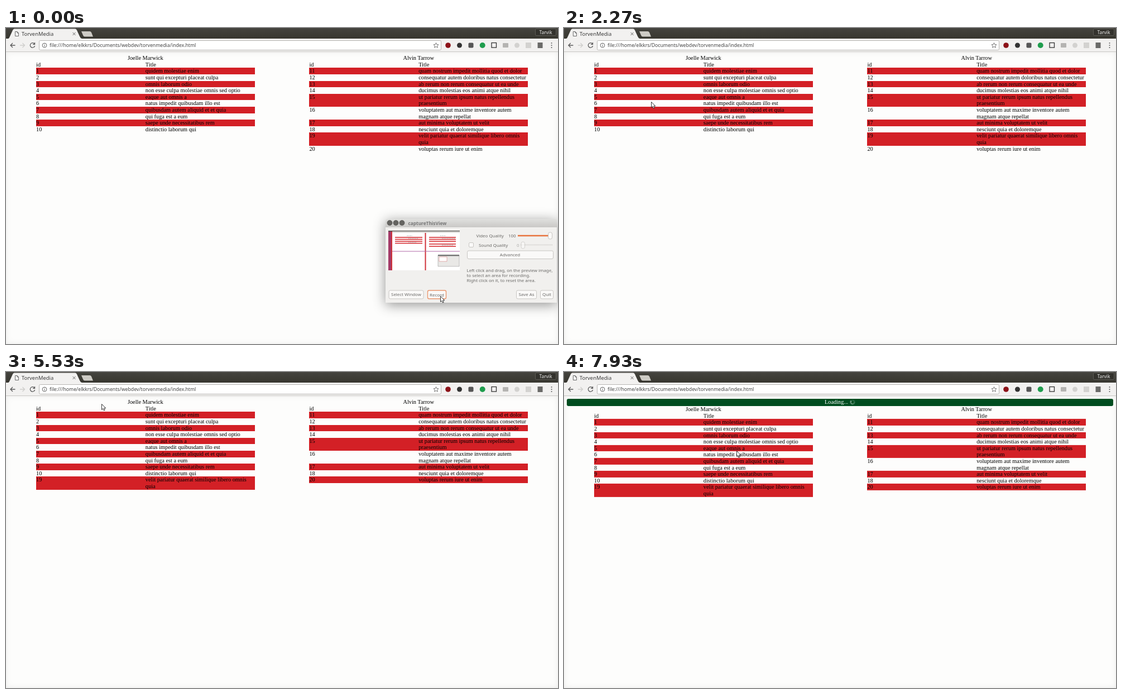
An HTML page for the animation above (8 s loop, 989 px wide and 566 px high).

```html
<!DOCTYPE html>
<html lang="en">
<head>
<meta charset="utf-8">
<title>Drag and drop tables</title>
<style>
html, body { margin: 0; width: 100%; height: 100%; overflow: hidden; background: #fdfdfc; }
#stage { position: relative; width: 989px; height: 566px; overflow: hidden; }
#stage > * { position: absolute; }
svg { display: block; left: 0; top: 0; }
.ui { font-family: "Noto Sans", "Open Sans", sans-serif; }

/* page */
.page, .ghost, #bar { font: 10.3px/11.59px "Liberation Serif", "Times New Roman", serif; color: #000; }
.page { left: 0; top: 48.2px; width: 989px; }
.list { position: absolute; top: 0; left: 54.1px; width: 391.5px; }
.list + .list { left: 543.45px; }
.name { text-align: center; }
.row { display: flex; }
.row span { width: 50%; }
.red { background: #d32026; }
.glow { inset: 43px 0 0; box-shadow: inset 0 0 12px rgba(0, 0, 0, .07); }

#bar { left: 5px; top: 48.2px; width: 979px; height: 12.9px; border-radius: 3px;
  background: #004d20; color: #fff; visibility: hidden; }
#bar b { position: absolute; left: 462px; font-weight: normal; }
#bar svg { position: absolute; left: 506.5px; top: 1.3px; animation: spin 1s steps(12) infinite; }

.ghost { left: 0; top: 0; width: 391.5px; opacity: .74; visibility: hidden;
  box-shadow: 0 6px 14px rgba(0, 0, 0, .4); }

/* timeline */
.before { animation: before 8s step-end infinite; }
.after { animation: after 8s step-end infinite; }
.page { visibility: hidden; }
#bar { animation: load 8s step-end infinite; }
#shift { inset: 0; animation: shift 8s step-end infinite; }
#shift > * { position: absolute; }
#recorder { animation: close 8s linear infinite; }
#g1 { animation: drag1 8s linear infinite, show1 8s step-end infinite; }
#g2 { animation: drag2 8s linear infinite, show2 8s step-end infinite; }
#pointer { left: 0; top: 0; animation: move 8s linear infinite; }
#arrow { animation: arrow 8s step-end infinite; }
#hand { animation: hand 8s step-end infinite; }

@keyframes before { 0% { visibility: visible } 51.25%, 100% { visibility: hidden } }
@keyframes after { 0% { visibility: hidden } 51.25%, 100% { visibility: visible } }
@keyframes load {
  0%, 51.25% { visibility: hidden }
  30%, 87.5%, 100% { visibility: visible }
}
@keyframes shift {
  0%, 51.25% { translate: 0 0 }
  30%, 87.5%, 100% { translate: 0 12.9px }
}
@keyframes close {
  0%, .875% { opacity: 1 }
  4.4%, 100% { opacity: 0 }
}
@keyframes drag1 {
  0%, 15.75% { translate: 543.4px 187.3px }
  17% { translate: 475px 178px }
  19.125%, 20% { translate: 212.4px 146.8px }
  21.5% { translate: 85px 126px }
  25%, 100% { translate: 64px 124px }
}
@keyframes show1 { 0%, 25.9% { visibility: hidden } 15.75% { visibility: visible } 100% { visibility: hidden } }
@keyframes drag2 {
  0%, 81.5% { translate: 543.4px 140.9px }
  85% { translate: 160px 138px }
  86.6%, 100% { translate: 72px 130px }
}
@keyframes show2 { 0%, 86.9% { visibility: hidden } 81.5% { visibility: visible } 100% { visibility: hidden } }
@keyframes arrow {
  0%, 25.9%, 86.9%, 100% { visibility: visible }
  15.4%, 81.2% { visibility: hidden }
}
@keyframes hand {
  0%, 25.9%, 86.9%, 100% { visibility: hidden }
  15.4%, 81.2% { visibility: visible }
}
@keyframes move {
  0%, .875% { translate: 778px 480px }
  3.75% { translate: 768px 455px }
  8% { translate: 660px 255px }
  10.875% { translate: 629px 198px }
  11.625%, 15% { translate: 628px 197px }
  16.25% { translate: 560px 188px }
  19.125%, 20% { translate: 253px 146px }
  21% { translate: 170px 136px }
  25% { translate: 149px 134px }
  28.375%, 29.1% { translate: 156px 132px }
  32% { translate: 190px 140px }
  35.9% { translate: 120px 200px }
  38.75% { translate: 420px 215px }
  41.25% { translate: 870px 110px }
  43.75% { translate: 500px 20px }
  46.6% { translate: 215px 140px }
  47.5%, 48.3% { translate: 203px 152px }
  50% { translate: 260px 130px }
  55%, 58.375% { translate: 345px 140px }
  60.6% { translate: 200px 190px }
  63.1% { translate: 40px 120px }
  65.6% { translate: 300px 50px }
  68.4% { translate: 173px 58px }
  69.125%, 70% { translate: 171px 57px }
  71.25% { translate: 90px 120px }
  74% { translate: 560px 20px }
  76.25% { translate: 960px 80px }
  78.1% { translate: 760px 162px }
  79.2%, 81% { translate: 714px 152px }
  84.4% { translate: 331px 150px }
  86.25% { translate: 243px 142px }
  90% { translate: 230px 140px }
  91.6% { translate: 90px 110px }
  94.4% { translate: 780px 70px }
  96.9% { translate: 500px 150px }
  99.125%, 100% { translate: 309px 141px }
}
@keyframes spin { to { rotate: 360deg } }

/* recorder window */
#recorder { left: 680px; top: 342px; width: 307px; height: 150px; }
#recorder svg { overflow: visible; filter: drop-shadow(0 4px 11px rgba(0, 0, 0, .42)); }
#recorder text { fill: #6b6a68; font-size: 7.9px; }
.btn { fill: #faf9f8; stroke: #bdbab6; stroke-width: .8; }
</style>
</head>
<body>
<div id="stage">
  <div class="glow"></div>
  <div id="shift">
    <div class="page before"></div>
    <div class="page after"></div>
  </div>
  <div id="bar"><b>Loading...</b><svg width="10" height="10" viewBox="-5 -5 10 10" id="spinner"></svg></div>

  <svg class="ui" width="989" height="44">
    <defs>
      <linearGradient id="top" x2="0" y2="1"><stop stop-color="#45443f"/><stop offset="1" stop-color="#37362f"/></linearGradient>
    </defs>
    <path fill="url(#top)" d="M0 0H989V19.5H0z"/>
    <path fill="#f2f1f0" d="M0 19H4Q6 18 7 15L12 4Q13 1.500 15 1.500H124Q126 1.500 127 4L132 15Q133 18 136 19H989V43H0z"/>
    <path stroke="#c9c7c4" d="M0 42.500H989"/>
    <path fill="#cdcbc5" d="M135 6H150Q152 6 153 8L156 15.500H141Q139 15.500 138 13z"/>
    <path fill="#fff" stroke="#555" stroke-width=".9" d="M16.500 6.500H20L22.500 9V14.500H16.500zM20 6.500V9H22.500"/>
    <text x="28" y="13.700" font-size="9.4" fill="#3a3a3a">TorvenMedia</text>
    <path stroke="#666" d="M119.500 8L124.500 13M124.500 8L119.500 13"/>
    <rect x="948.500" y="1.500" width="37" height="12" rx="1.500" fill="#33322d" stroke="#5b5a54"/>
    <text x="967" y="10.700" font-size="8.3" fill="#eee" text-anchor="middle">Tarvik</text>

    <g fill="none" stroke="#5a5a5a" stroke-width="1.300">
      <path d="M16.500 31H8M12 27L8 31L12 35"/>
      <path stroke="#cfcecc" d="M25 31H33.500M29.500 27L33.500 31L29.500 35"/>
      <path d="M51 28.500A4.200 4.200 0 1 0 51.600 32M51.500 26V29.300H48"/>
    </g>
    <rect x="59.500" y="22.500" width="720" height="17" rx="2" fill="#fff" stroke="#b8b6b3"/>
    <circle cx="69" cy="31" r="3.900" fill="none" stroke="#666"/>
    <path stroke="#666" d="M69 30.300V33.300M69 28.500V29.500"/>
    <text x="78" y="34" font-size="8.7" fill="#444">file:///home/elkkrs/Documents/webdev/torvenmedia/index.html</text>
    <path fill="none" stroke="#666" stroke-width=".9" d="M770.500 26.500L771.800 29.500L775 29.800L772.600 32L773.300 35.200L770.500 33.500L767.700 35.200L768.400 32L766 29.800L769.200 29.500z"/>
    <circle cx="792" cy="31" r="4.800" fill="#8c1218"/>
    <circle cx="812.500" cy="31" r="4.500" fill="#333"/>
    <rect x="828.500" y="26.500" width="9" height="9" rx="2" fill="#555"/>
    <circle cx="853.700" cy="31" r="5" fill="#1f9d4d"/>
    <rect x="870" y="26.500" width="8.500" height="8.500" fill="none" stroke="#333" stroke-width="1.300"/>
    <rect x="890" y="27" width="10" height="8" rx="1" fill="#b5b4b2"/>
    <circle cx="915.500" cy="31" r="4.500" fill="#d3d2d0"/>
    <rect x="931" y="26" width="10" height="10" fill="#d3d2d0"/>
    <rect x="952.500" y="26" width="9" height="10" fill="#6a6a68"/>
    <g fill="#5a5a5a"><circle cx="977.500" cy="27" r="1"/><circle cx="977.500" cy="31" r="1"/><circle cx="977.500" cy="35" r="1"/></g>
  </svg>

  <div id="recorder" class="ui">
    <svg width="307" height="150" viewBox="680 342 307 150">
      <defs><linearGradient id="title" x2="0" y2="1"><stop stop-color="#e0e0de"/><stop offset="1" stop-color="#c9c8c6"/></linearGradient></defs>
      <path fill="url(#title)" d="M680 357V346Q680 342 684 342H983Q987 342 987 346V357z"/>
      <path fill="#f1f0ee" d="M680 357H987V492H680z"/>
      <g fill="#656461" stroke="#4f4e4b" stroke-width=".7">
        <circle cx="687.500" cy="349" r="4.500"/><circle cx="698.500" cy="349" r="4.500"/><circle cx="709.500" cy="349" r="4.500"/>
      </g>
      <text x="720.500" y="352.500" style="fill:#777;font-size:8.3px;font-weight:600">captureThisView</text>

      <path fill="#fff" d="M685 363H813V434H685z"/>
      <path fill="#a33a68" d="M685 363H691V434H685z"/>
      <path fill="#d0333a" d="M690 363H692V434H690zM750.500 367H752.500V434H750.500z"/>
      <path fill="#4a4945" d="M685 363H813V364.500H685z"/>
      <path fill="#deddda" d="M692 364.500H813V367H692z"/>
      <path stroke="#b06aa8" d="M692 400H813"/>
      <path stroke="#d32026" stroke-width="1.500" d="M697 375H746M697 378.500H746M697 382H746M697 385.500H746M758 375H806M758 378.500H806M758 382H806M758 387H806M758 391H806"/>
      <path stroke="#777" stroke-width=".6" stroke-dasharray="2 1" d="M718 372H728M721 377H738M721 384H736M778 372H788M781 377H804M781 389H802"/>
      <path fill="#e9e8e6" stroke="#999" stroke-width=".6" d="M774 407H812V427H774z"/>
      <path fill="#777" d="M774 406H812V408.500H774z"/>
      <path fill="#fff" stroke="#c66" stroke-width=".5" d="M776 410H790V418H776z"/>

      <text x="842.500" y="375">Video Quality</text><text x="900" y="375">100</text>
      <path stroke="#e8733e" stroke-width="2.600" d="M917 372H975"/>
      <rect class="btn" x="971.500" y="366" width="7" height="12" rx="3"/>
      <rect class="btn" x="829.500" y="384.500" width="8" height="8" rx="1.500"/>
      <text x="847" y="392">Sound Quality</text><text x="915" y="392" opacity=".5">0</text>
      <path stroke="#c5c3c0" stroke-width="1.500" stroke-dasharray="1 1" d="M922 388.500H980"/>
      <rect class="btn" x="923" y="383" width="6.500" height="12" rx="3" opacity=".7"/>
      <rect class="btn" x="826.500" y="399" width="154" height="14.500" rx="2.500"/>
      <text x="903" y="409" text-anchor="middle">Advanced</text>
      <text x="825.500" y="437">Left click and drag, on the preview image,</text>
      <text x="825.500" y="446">to select an area for recording.</text>
      <text x="825.500" y="455">Right click on it, to reset the area.</text>
      <rect class="btn" x="686" y="470" width="62" height="15" rx="2.500"/>
      <rect class="btn" x="755.500" y="470" width="33" height="15" rx="2.500" style="stroke:#e9976f;stroke-width:1.400"/>
      <rect class="btn" x="914.500" y="470" width="36" height="15" rx="2.500"/>
      <rect class="btn" x="957.500" y="470" width="23" height="15" rx="2.500"/>
      <g text-anchor="middle">
        <text x="717" y="480.300">Select Window</text><text x="772" y="480.600">Record</text>
        <text x="932.500" y="480.300">Save As</text><text x="969" y="480.300">Quit</text>
      </g>
    </svg>
  </div>

  <div class="ghost red" id="g1"></div>
  <div class="ghost" id="g2"></div>

  <svg id="pointer" width="20" height="20" overflow="visible">
    <path id="arrow" fill="#fff" stroke="#222" stroke-width=".9" d="M.5 .5V10.500L2.800 8.500L4.400 12L6.200 11.200L4.700 7.800H7.800z"/>
    <path id="hand" fill="#fff" stroke="#222" stroke-width=".9" d="M-4 -1Q-4 -3.500 -2 -3.500Q0 -5 1.500 -3.500Q4.500 -4 4.500 -1V1Q4 4 2.500 4H-2Q-4.500 2 -4 -1z"/>
  </svg>
</div>

<script>
const titles = [
  "quidem molestiae enim", "sunt qui excepturi placeat culpa", "omnis laborum odio",
  "non esse culpa molestiae omnis sed optio", "eaque aut omnis a", "natus impedit quibusdam illo est",
  "quibusdam autem aliquid et et quia", "qui fuga est a eum", "saepe unde necessitatibus rem",
  "distinctio laborum qui", "quam nostrum impedit mollitia quod et dolor",
  "consequatur autem doloribus natus consectetur", "ab rerum non rerum consequatur ut ea unde",
  "ducimus molestias eos animi atque nihil", "ut pariatur rerum ipsum natus repellendus praesentium",
  "voluptatem aut maxime inventore autem magnam atque repellat", "aut minima voluptatem ut velit",
  "nesciunt quia et doloremque", "velit pariatur quaerat similique libero omnis quia",
  "voluptas rerum iure ut enim"
];
const $ = s => document.querySelector(s);
const cells = (id, title) => `<span>${id}</span><span>${title}</span>`;
const row = (id, i) => `<div class="row${i % 2 ? "" : " red"}">${cells(id, titles[id - 1])}</div>`;
const list = (name, ids) =>
  `<div class="list"><div class="name">${name}</div><div class="row">${cells("id", "Title")}</div>${ids.map(row).join("")}</div>`;
const range = from => Array.from({ length: 10 }, (_, i) => from + i);
const page = (left, right) => list("Joelle Marwick", left) + list("Alvin Tarrow", right);

const left = range(1), right = range(11);
$(".before").innerHTML = page(left, right);
$(".after").innerHTML = page([...left, 19], right.filter(id => id !== 19));
$("#g1").innerHTML = row(19, 0);
$("#g2").innerHTML = row(16, 1);
$("#g2").style.background = "#fdfdfc";

$("#spinner").innerHTML = Array.from({ length: 12 }, (_, i) =>
  `<path stroke="#fff" stroke-width=".9" opacity="${0.1 + i / 14}" transform="rotate(${i * 30})" d="M0 -2.300V-4.600"/>`).join("");
</script>
</body>
</html>
```
